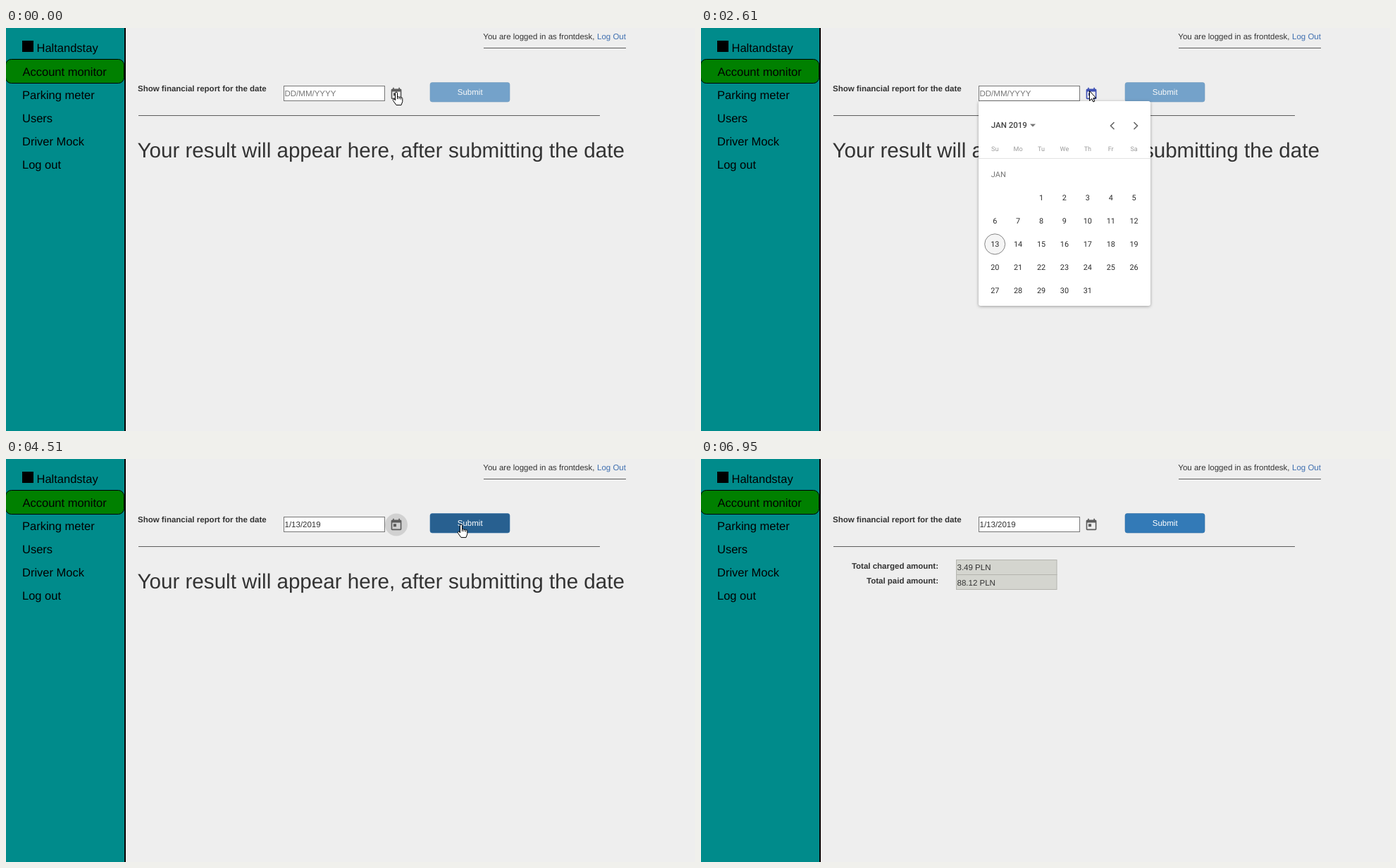
Write an HTML page that moves like this. It is 978 px wide and 573 px high and loops after 7050 ms.

```html
<!DOCTYPE html>
<html lang="en">
<head>
<meta charset="utf-8">
<title>Account monitor</title>
<style>
  html, body { margin: 0; width: 100%; height: 100%; overflow: hidden; background: #eee; }
  svg { display: block; }
  text { font-family: "Liberation Sans", Arial, sans-serif; font-size: 11.5px; fill: #333; text-rendering: geometricPrecision; }
  .menu text { font-size: 16.5px; fill: #000; }
  .bold { font-weight: bold; }
  .end { text-anchor: end; }
  .mid { text-anchor: middle; }
  .rule { stroke: #5c5c5c; }
  .field { fill: #fff; stroke: #767676; }
  .readonly { fill: #d4d5cf; stroke: #b4b4ae; }
  #popup text { font-family: Roboto, sans-serif; }
  #popup .month { font-weight: 500; fill: #444; }
  #popup .week { font-size: 9px; fill: #9a9a9a; }
  #popup .day { font-size: 10.8px; fill: #2b2b2b; }
  .sheet { fill: #fff; filter: drop-shadow(0 1.5px 2px rgba(0, 0, 0, .34)); }
  .chevron { fill: none; stroke: #666; stroke-width: 1.6; }
  .cursor { fill: #fff; stroke: #000; stroke-linejoin: round; }
</style>
</head>
<body>
<svg id="stage" width="978" height="573" viewBox="0 0 978 573">
  <rect width="978" height="573" fill="#eee"/>
  <g class="menu">
    <rect width="168" height="573" fill="#008b8b"/>
    <rect x="168" width="2" height="573"/>
    <rect x="-.5" y="44.5" width="168" height="34" rx="8" fill="#008000" stroke="#000"/>
    <rect x="23" y="18" width="16" height="16"/>
    <text x="43.5" y="34">Haltandstay</text>
    <text x="23.5" y="67.5">Account monitor</text>
    <text x="23" y="101">Parking meter</text>
    <text x="23" y="134">Users</text>
    <text x="23" y="167">Driver Mock</text>
    <text x="23" y="200">Log out</text>
  </g>

  <text class="end" x="835.5" y="16">You are logged in as frontdesk,</text>
  <text x="839" y="16" style="fill:#3f6fb0">Log Out</text>
  <path class="rule" d="M678 28.5H880M188 124.5H843"/>

  <text class="bold" x="187" y="90">Show financial report for the date</text>
  <rect class="field" x="394.5" y="82.5" width="143" height="21"/>
  <text id="date" x="395.5" y="97"></text>

  <circle id="halo" cx="554" cy="93.5" r="16"/>
  <path id="icon" transform="translate(544.2 84) scale(.82)" d="M19 3h-1V1h-2v2H8V1H6v2H5c-1.1 0-2 .9-2 2v14c0 1.1.9 2 2 2h14c1.1 0 2-.9 2-2V5c0-1.1-.9-2-2-2zm0 16H5V8h14zM7 10h5v5H7z"/>

  <rect id="ring" x="601.5" y="76.5" width="114" height="29" rx="2" fill="none" stroke="#5b9bdc" stroke-width="1.2"/>
  <g id="submit">
    <rect id="button" x="602" y="77.5" width="113" height="27.5" rx="3"/>
    <text class="mid" x="658.7" y="95" style="fill:#fff">Submit</text>
  </g>

  <text id="hint" x="186.5" y="184" style="font-size:29.6px">Your result will appear here, after submitting the date</text>
  <g id="result">
    <text class="bold end" x="337" y="156">Total charged amount:</text>
    <text class="bold end" x="337" y="177">Total paid amount:</text>
    <rect class="readonly" x="362.5" y="143.5" width="142.5" height="21"/>
    <rect class="readonly" x="362.5" y="164.5" width="142.5" height="21"/>
    <text x="363.5" y="158">3.49 PLN</text>
    <text x="363.5" y="179.5">88.12 PLN</text>
  </g>

  <g id="popup">
    <rect class="sheet" x="394" y="104" width="244" height="291" rx="3"/>
    <text class="month" x="411.8" y="142">JAN 2019</text>
    <path d="M467 136.5h8l-4 4z" fill="#757575"/>
    <path class="chevron" d="M586.5 134l-5 5 5 5M614.5 134l5 5-5 5"/>
    <path d="M394 185.5H638" stroke="#e2e2e2"/>
    <text x="411.8" y="211.5" style="font-size:11px;fill:#757575">JAN</text>
    <circle id="hover" r="14.5" fill="#000" fill-opacity=".04"/>
    <circle cx="417.2" cy="307.3" r="14.5" fill="#000" fill-opacity=".04" stroke="#858585"/>
  </g>

  <g id="cursor" class="cursor">
    <path id="arrow" d="M.5.5V14.4L3.7 11.5 5.8 16 7.8 15.1 5.8 10.7H9.8Z"/>
    <path id="hand" d="M-1.5 12V1.6a1.5 1.5 0 0 1 3 0V7.3a1.4 1.4 0 0 1 2.5.4 1.4 1.4 0 0 1 2.5.6 1.3 1.3 0 0 1 2.3 1V13.6L7 18.6H0L-4.4 12.4a1.5 1.5 0 0 1 2.2-2Z M1.5 7v3M4 7.8v2.4M6.5 8.5v2"/>
  </g>
</svg>
<script>
const LOOP = 7050;
const OPEN = 1960, PICK = 3570, PRESS = 4880, DONE = 4930, BLUR = 6950;
const el = {};
document.querySelectorAll('[id]').forEach(n => el[n.id] = n);

// Calendar grid
const COL = 32.9, ROW = 33, LEFT = 417.2, TOP = 241.3;
const colX = c => LEFT + c * COL;
const rowY = r => TOP + r * ROW;

function label(str, cls, x, y) {
  const node = document.createElementNS('http://www.w3.org/2000/svg', 'text');
  node.setAttribute('class', cls + ' mid');
  node.setAttribute('x', x);
  node.setAttribute('y', y);
  node.textContent = str;
  el.popup.append(node);
}
['Su', 'Mo', 'Tu', 'We', 'Th', 'Fr', 'Sa'].forEach((d, c) => label(d, 'week', colX(c), 175.3));
for (let day = 1; day <= 31; day++) {
  const cell = day + 1;
  label(day, 'day', colX(cell % 7), rowY(Math.floor(cell / 7)) + 4);
}

// Pointer trips: start, end, number of steps, way points
const trips = [
  [240, 820, 11, [[554, 91], [520, 58], [478, 26], [480, 19], [511, 41]]],
  [1070, 1480, 8, [[511, 41], [533, 66], [558, 96], [550, 94]]],
  [2080, 2610, 10, [[550, 94], [551, 89]]],
  [2670, 3140, 9, [[551, 89], [535, 160], [480, 255], [417.5, 311.5]]],
  [3570, 4090, 9, [[417.5, 311.5], [440, 290], [540, 205], [619, 136], [645, 84]], true],
  [4400, 4510, 3, [[645, 84], [645.5, 92.5]]],
  [5110, 5460, 7, [[645.5, 92.5], [618, 150], [594, 215], [595, 229]]],
  [5710, 6400, 13, [[595, 229], [690, 330], [830, 460], [937, 569]]],
  [6460, 6520, 2, [[937, 569], [944, 580]]]
];
const smooth = u => u * u * (3 - 2 * u);

// Catmull-Rom curve through the way points
function along(pts, u) {
  const last = pts.length - 1;
  const i = Math.min(Math.floor(u * last), last - 1);
  const f = u * last - i;
  const at = k => pts[Math.max(0, Math.min(last, k))];
  return [0, 1].map(a => {
    const p = at(i - 1)[a], q = at(i)[a], r = at(i + 1)[a], s = at(i + 2)[a];
    return q + f / 2 * (r - p + f * (2 * p - 5 * q + 4 * r - s + f * (3 * (q - r) + s - p)));
  });
}

function pointerAt(t) {
  let pos = trips[0][3][0];
  for (const [start, end, steps, pts, linear] of trips) {
    if (t < start) break;
    const step = Math.min(steps, 1 + Math.floor((t - start) / (end - start) * (steps - 1)));
    const u = step / steps;
    pos = along(pts, linear ? u : smooth(u));
  }
  return pos;
}

// Value that jumps at set times
const jump = (t, ...marks) => marks.reduce((v, [at, next]) => t >= at ? next : v, 0);

function cellAt(x, y) {
  const c = Math.round((x - LEFT) / COL), r = Math.round((y - TOP) / ROW);
  const day = r * 7 + c - 1;
  return c >= 0 && c < 7 && r >= 0 && day > 0 && day < 32 ? { c, r, day } : null;
}

const show = (node, on) => node.style.display = on ? '' : 'none';

function draw(t) {
  const [x, y] = pointerAt(t);
  const open = t >= OPEN && t < PICK;
  const picked = t >= PICK;

  const fade = jump(t, [OPEN, .23], [2020, .94], [2080, 1], [PICK, .6], [3620, .15], [3680, 0]);
  const squash = picked ? 1 : .8 + .2 * fade;
  el.popup.setAttribute('transform', `translate(0 ${104 * (1 - squash)}) scale(1 ${squash})`);
  el.popup.style.opacity = fade;
  show(el.popup, fade > 0);

  const cell = open ? cellAt(x, y) : null;
  show(el.hover, cell && cell.day !== 13);
  if (cell) {
    el.hover.setAttribute('cx', colX(cell.c));
    el.hover.setAttribute('cy', rowY(cell.r));
  }

  const overIcon = !open && Math.hypot(x - 554, y - 93.5) < 16;
  const overButton = picked && x > 602 && x < 715 && y > 77 && y < 105;

  el.date.textContent = picked ? '1/13/2019' : 'DD/MM/YYYY';
  el.date.style.fill = picked ? '#333' : '#757575';
  el.icon.style.fill = open ? '#3f51b5' : '#5c5c5c';
  el.halo.style.fill = picked ? '#000' : '#3f51b5';
  el.halo.style.opacity = open ? .12 * Math.min(1, Math.max(0, (2610 - t) / 500))
    : picked && t < PRESS ? .12 : 0;

  const focused = t >= DONE && t < BLUR;
  const pressed = t >= PRESS && t < DONE;
  el.submit.style.opacity = picked ? 1 : .65;
  el.button.style.fill = pressed ? '#204d74' : focused || overButton ? '#286090' : '#337ab7';
  el.button.style.stroke = focused ? 'none' : '#2e6da4';
  el.button.style.strokeWidth = .6;
  show(el.ring, focused);
  show(el.hint, t < DONE);
  show(el.result, t >= DONE);

  const hand = overIcon || overButton || !!cell;
  show(el.hand, hand);
  show(el.arrow, !hand);
  el.cursor.setAttribute('transform', `translate(${Math.round(x)} ${Math.round(y)})`);
}

const begin = performance.now();
function tick() {
  draw((performance.now() - begin) % LOOP);
  requestAnimationFrame(tick);
}
tick();
</script>
</body>
</html>
```
